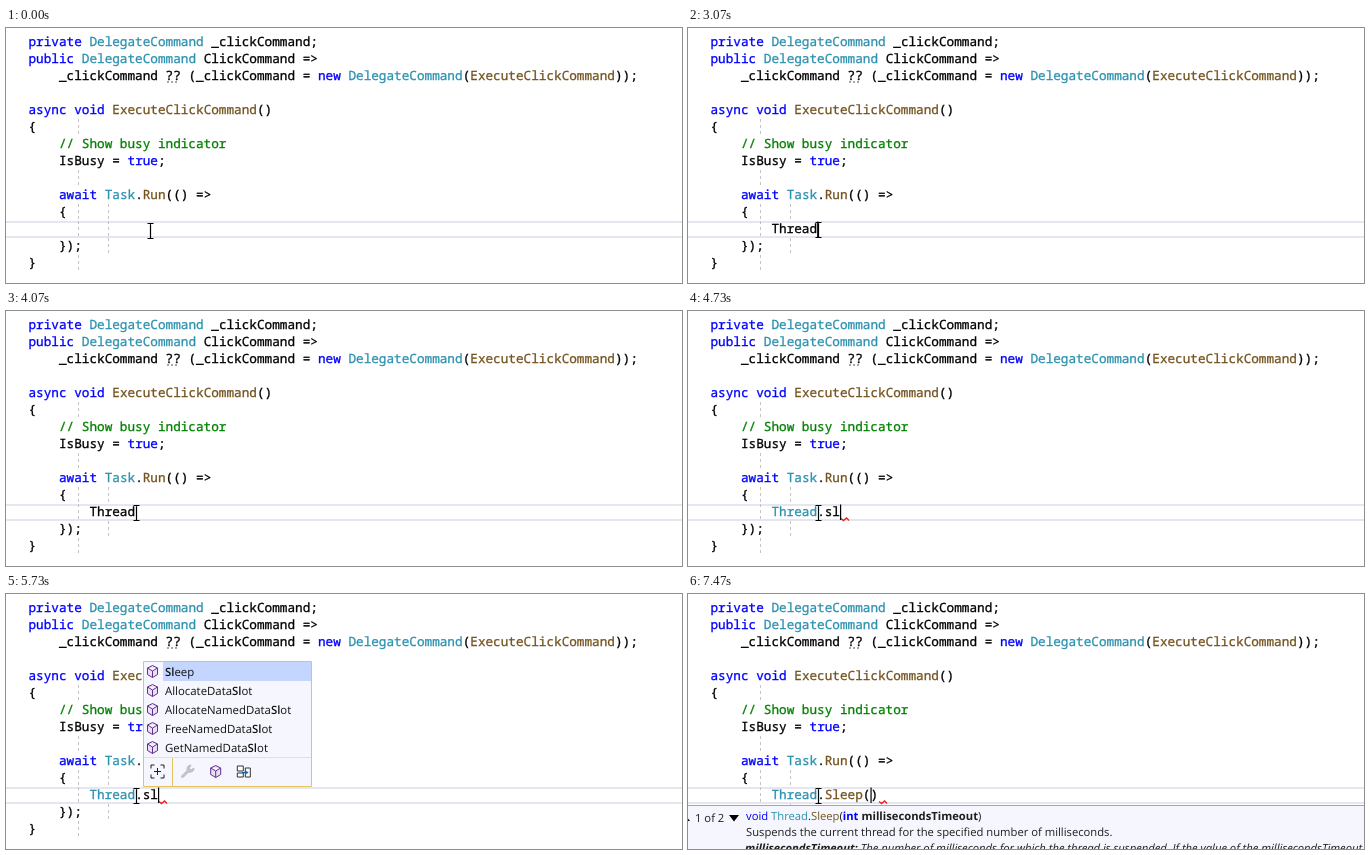
Write an HTML page that moves like this. It is 676 px wide and 255 px high and loops after 8 s.

```html
<!DOCTYPE html>
<html lang="en">
<head>
<meta charset="utf-8">
<title>Code completion</title>
<style>
  html, body { margin: 0; width: 100%; height: 100%; overflow: hidden; background: #fff; }
  svg { display: block; width: 676px; height: 255px; overflow: hidden; }
  text { text-rendering: geometricPrecision; }
  text, tspan { fill: currentColor; }
  .code { font: 12.695px "Noto Sans Mono", "DejaVu Sans Mono", monospace; color: #000; }
  .code tspan { stroke: currentColor; stroke-width: .3; }
  .ui { font: 11.24px "Open Sans", "Noto Sans", sans-serif; color: #1e1e1e; }
  .list { font-size: 11.4px; color: #111; }
  .ns { color: #666; text-anchor: end; }
  .b { font-weight: 700; }
  .list .b { font-weight: 600; }
  .i { font-style: italic; }
  .kw { color: #00f; }
  .type { color: #2b91af; }
  .fn { color: #74531f; }
  .note { color: #008000; }
  .guide { stroke: #c3c3c3; stroke-dasharray: 3 3; }
  .panel { fill: #f6f7fe; stroke: #9ba7c0; }
  .gold { stroke: #e5c365; fill: #f6f7fe; }
  .off { opacity: .3; }
</style>
</head>
<body>
<svg viewBox="0 0 676 255" xmlns="http://www.w3.org/2000/svg">
  <defs>
    <g id="class" fill="#f3e8cb" stroke="#94670f">
      <path d="M-7-2l4-4 4 4-4 4zM2 0l3-3 2.500 2.500-3 3zM1 5l3-3 2.500 2.500-3 3z"/>
      <path d="M0-2h4M-2 1v3h3" fill="none"/>
    </g>
    <g id="delegate" fill="#eadff3" stroke="#652d90">
      <path d="M-6.500-3.500h13v9h-13zM-2.500-3.500v-3h5v3M-3.500-3.500v9M3.500-3.500v9"/>
    </g>
    <g id="enum" fill="#f3e8cb" stroke="#94670f">
      <path d="M-2.500-5.500h9v6h-9zM-6.500-1.500h8v7h-8zM-4.500 1h4M-4.500 3h4M1-3h4"/>
    </g>
    <g id="cube" fill="#eadff3" stroke="#652d90">
      <path d="M0-6l5 2.500v6.500l-5 3-5-3v-6.500zM-5-3.500l5 3 5-3M0-.500v6.500"/>
    </g>
    <g id="expand" fill="none" stroke="#1e1e1e">
      <path d="M-6.500-3v-3.500h3.500M3-6.500h3.500v3.500M6.500 3v3.500h-3.500M-3 6.500h-3.500v-3.500M-3.500 0h7M0-3.500v7"/>
    </g>
    <g id="braces" fill="none" stroke="#333">
      <path d="M-3-5h-1.500v4l-1.500 1 1.500 1v4h1.500M3-5h1.500v4l1.500 1-1.500 1v4h-1.500"/>
    </g>
    <g id="struct" fill="#777" stroke="#444">
      <path d="M-2.500-5.500h9v7h-9zM-6.500-.500h8v6h-8z"/>
    </g>
    <g id="iface" fill="#dcebf8" stroke="#0a5fa8" stroke-width="1.300">
      <circle cx="-4.500" r="2.300"/><circle cx="4.500" r="2.700"/><path d="M-2 0h4"/>
    </g>
    <g id="tag" fill="#ccc" stroke="#333">
      <path d="M-6 1l6-6 6 2v3l-6 5-6-2zM-6 1l6 2 6-5M0 3v2"/>
    </g>
    <g id="bolt" fill="#bbb" stroke="#333"><path d="M0-6.500h4l-3 4.500h3.500l-7.500 8 2-6h-3z"/></g>
    <g id="wrench" fill="#555" stroke="#333">
      <path d="M-6 4.500l5.500-5.500q-1-4 3-5.500l1 .500-2 2.500 2 2 2.500-2 .500 1q-1.500 4-5.500 3l-5.500 5.500q-2 0-1.500-1.500z"/>
    </g>
    <g id="lines" fill="none" stroke="#333" stroke-width="1.500">
      <path d="M-7-5h14M-7-1.500h6M1-1.500h6M-7 2h9M-7 5.500h14"/>
    </g>
    <g id="snippet" fill="none" stroke="#333">
      <path d="M-5.500 5.500v-11h10v11"/><path d="M-5.500 5.500h10" stroke-dasharray="2 1.500"/>
    </g>
    <g id="ext" fill="#fff" stroke="#333">
      <path d="M-6.500-5.500h6v5h-6zM-6.500 1.500h6v4h-6zM1.500-3.500h5v9h-5z"/>
      <path d="M-2 1h6M2-1l2 2-2 2" fill="none" stroke="#0a5fa8"/>
    </g>
  </defs>

  <path d="M0 194h676M0 209h676" stroke="#e6e6f0" stroke-width="2"/>
  <g id="guides" class="guide"></g>
  <path id="midGuide" class="guide" d="M102.500 193v17"/>
  <g id="page" class="code"></g>
  <path d="M161 54h2m2 0h2m2 0h2" stroke="#8a8a8a" stroke-width="1.500"/>
  <g id="typed" class="code"></g>
  <path id="wave" d="M0 207.500l2.500 2 3-2.500 2.500 2.500" fill="none" stroke="#f02020" stroke-width="1.400"/>
  <rect id="caret" y="193.500" width="1.200" height="15.500"/>

  <g id="popups" class="ui"></g>
  <path id="corner" d="M306.500 76v-7.500h8" fill="none" stroke="#9ba7c0"/>
  <g id="sig" class="ui">
    <path class="panel" d="M-2 211.500h680v50H-2z"/>
    <path d="M41 221h10l-5 6.500zM-8 227h10l-5-6.500z"/>
    <text x="7" y="227.500">1 of 2</text>
    <text x="58" y="226"><tspan class="kw">void</tspan> <tspan class="type">Thread</tspan>.<tspan class="fn">Sleep</tspan>(<tspan class="b"><tspan class="kw">int</tspan> millisecondsTimeout</tspan>)</text>
    <text x="58" y="242">Suspends the current thread for the specified number of milliseconds.</text>
    <text x="57" y="258" class="i"><tspan class="b">millisecondsTimeout:</tspan> The number of milliseconds for which the thread is suspended. If the value of the millisecondsTimeout argument is zero</text>
  </g>
  <path id="beam" fill="none" stroke="#000" stroke-width="1.200" d="M-3-7.500h2.500l.500.500.500-.500h2.500M0-7.500v15M-3 7.500h2.500l.500-.500.500.500h2.500"/>
</svg>
<script>
const LOOP = 8000, CH = 7.617, LEFT = 22.5, ROW = 17;
const $ = id => document.getElementById(id);
const colX = col => LEFT + col * CH;

const words = {
  kw: 'private public new async void true await',
  type: 'DelegateCommand Task',
  fn: 'ExecuteClickCommand Run'
};
const styles = {};
for (const k in words) for (const w of words[k].split(' ')) styles[w] = k;

const esc = s => s.replace(/&/g, '&amp;').replace(/</g, '&lt;').replace(/>/g, '&gt;');

// One line of code, every token set on the character grid
function codeLine(row, str, map) {
  let out = '';
  for (const m of str.matchAll(/\/\/.*|\w+|[^\w\s]+/g)) {
    const cls = m[0].startsWith('//') ? 'note' : map[m[0]] || '';
    out += `<tspan x="${colX(m.index)}" class="${cls}">${esc(m[0])}</tspan>`;
  }
  return `<text y="${17.8 + row * ROW}">${out}</text>`;
}

$('page').innerHTML = `private DelegateCommand _clickCommand;
public DelegateCommand ClickCommand =>
    _clickCommand ?? (_clickCommand = new DelegateCommand(ExecuteClickCommand));

async void ExecuteClickCommand()
{
    // Show busy indicator
    IsBusy = true;

    await Task.Run(() =>
    {

    });
}`.split('\n').map((s, i) => codeLine(i, s, styles)).join('');

const guide = (x, row) => `<path d="M${x} ${6 + row * ROW}v${ROW}"/>`;
$('guides').innerHTML = [5, 8, 10, 11, 13].map(r => guide(72.5, r)).join('')
  + guide(102.5, 10) + guide(102.5, 12);

const icon = (id, x, y, cls = '') =>
  `<use href="#${id}" class="${cls}" transform="translate(${x} ${y})"/>`;

// Completion list; rows are [icon, name, namespace], a bar entry with "-" is dimmed
function list({ id, x, w, rows, match, bar, scroll }) {
  const top = -8, end = top + rows.length * 19, right = x + w;
  let out = `<path class="gold" d="M${x + .5} ${top - .5}h${w - 1}V${end + 29.5}h${1 - w}z"/>`
    + `<rect x="${x + 20}" y="${top}" width="${w - (scroll ? 38 : 21)}" height="19" fill="#c4d5ff"/>`;
  rows.forEach(([ic, name, ns = ''], i) => {
    const y = top + 9.5 + i * 19;
    out += icon(ic, x + 9.5, y)
      + `<text class="list" x="${x + 22}" y="${y + 4}">`
      + esc(name).replace(match, m => `<tspan class="b">${m}</tspan>`) + '</text>'
      + `<text class="list ns" x="${right - 21}" y="${y + 4}">${ns}</text>`;
  });
  if (scroll) out += `<path d="M${right - 18} ${top}h17V${end}h-17z" fill="#e8e8ee"/>`
    + `<path d="M${right - 14} 9h9V52h-9z" fill="#c2c3c9"/>`
    + `<path d="M${right - 13.5} ${end - 11}h8l-4 5zM${right - 13.5} 3h8l-4-5z" fill="#868999"/>`
    + `<path d="M${x + 3} ${end + 3}h24v24h-24z" fill="#c4d5ff"/>`;
  out += `<path d="M${x + 1} ${end + .5}h${w - 2}" stroke="#dcdfec"/>`
    + `<path class="gold" d="M${x + (scroll ? 28.5 : 29.5)} ${end + 1}v28"/>`;
  bar.split(' ').forEach((name, i) => {
    const dim = name[0] === '-';
    out += icon(dim ? name.slice(1) : name, x + 14.5 + i * 28.1 + (i ? 2 : 0), end + 14.5, dim ? 'off' : '');
  });
  return `<g id="${id}">${out}</g>`;
}

const tip = (id, x, y, w, ic, head, body) => `<g id="${id}">
  <path class="panel" d="M${x + .5} ${y + .5}h${w}v41h${-w}z"/>${icon(ic, x + 12, y + 12)}
  <text x="${x + 24}" y="${y + 16}">${head}</text><text x="${x + 6}" y="${y + 33}">${body}</text></g>`;

const T = 'System.Threading';
const slots = ['AllocateDataSlot', 'AllocateNamedDataSlot', 'FreeNamedDataSlot', 'GetNamedDataSlot'];
const members = names => names.map(n => ['cube', n]);
const memberBar = 'expand -wrench cube ext';

$('popups').innerHTML =
  list({
    id: 'types', x: 84, w: 368, match: /^Thread/, scroll: true,
    rows: [
      ['class', 'Thread', T], ['class', 'ThreadAbortException', T],
      ['class', 'ThreadExceptionEventArgs', T], ['delegate', 'ThreadExceptionEventHandler', T],
      ['class', 'ThreadingAclExtensions', T], ['class', 'ThreadInterruptedException', T],
      ['class', 'ThreadLocal<>', T], ['delegate', 'ThreadMessageEventHandler', 'System.Windows.Interop'],
      ['enum', 'ThreadOption', 'Prism.Events']
    ],
    bar: 'expand -braces class -struct iface enum delegate -tag -bolt -wrench -cube -lines -snippet'
  })
  + list({
    id: 'wide', x: 137, w: 175, match: /S/, bar: memberBar,
    rows: members(['Sleep', 'SetData', 'SpinWait', ...slots, 'ReferenceEquals', 'ResetAbort'])
  })
  + list({ id: 'short', x: 137, w: 169, match: /Sl/, bar: memberBar, rows: members(['Sleep', ...slots]) })
  + tip('typeTip', 452, -8, 400, 'class',
    `<tspan class="kw">class</tspan> ${T}.<tspan class="type">Thread</tspan>`,
    'Creates and controls a thread, sets its priority, and gets its status.')
  + tip('sleepTip', 306, 68, 385, 'cube',
    '<tspan class="kw">void</tspan> <tspan class="type">Thread</tspan>.<tspan class="fn">Sleep</tspan>(<tspan class="kw">int</tspan> millisecondsTimeout) (+ 1 overload)',
    'Suspends the current thread for the specified number of milliseconds.');

// Value of the last step whose time has come
const at = (t, steps) => steps.filter(s => s[0] <= t).pop()[1];
const show = (id, on) => { $(id).style.display = on ? '' : 'none'; };
const within = (t, a, b) => t >= a && t < b;

const mouse = [[0, [144.5, 203]], [70, [138.5, 203]], [130, [131.5, 202.5]], [270, [130.5, 202]]];
const typing = [[0, ''], [1870, 'T'], [2130, 'Th'], [2330, 'Thr'], [2530, 'Thre'], [2800, 'Threa'],
  [3070, 'Thread'], [4130, 'Thread.'], [4330, 'Thread.s'], [4730, 'Thread.sl'],
  [6070, 'Thread.Sleep'], [7470, 'Thread.Sleep()']];
const blink = [[0, 0], [400, 1], [930, 0], [1470, 1], [3670, 0], [4130, 1], [5200, 0],
  [5730, 1], [6600, 0], [7000, 1]];
const typeFade = [[0, 0], [3930, .5], [4000, 1], [4070, 0]];
const sleepFade = [[0, 0], [5800, .5], [5870, 1], [6070, 0]];

let last = '';
function draw(t) {
  const text = at(t, typing), [mx, my] = at(t, mouse);
  const map = { Thread: t >= 4730 ? 'type' : '', Sleep: t >= 6800 ? 'fn' : '' };
  const key = text + map.Thread + map.Sleep;
  if (key !== last) $('typed').innerHTML = codeLine(11, ' '.repeat(8) + text, map);
  last = key;

  const col = 8 + text.length;
  $('caret').setAttribute('x', colX(t >= 7470 ? col - 1 : col));
  $('wave').setAttribute('transform', `translate(${colX(col) + 1} 0)`);
  $('beam').setAttribute('transform', `translate(${mx} ${my})`);
  $('short').setAttribute('transform', `translate(0 ${t >= 5270 ? 76 : 0})`);
  $('typeTip').style.opacity = at(t, typeFade);
  $('sleepTip').style.opacity = at(t, sleepFade);
  show('caret', at(t, blink));
  show('wave', t >= 4130);
  show('midGuide', t < 2330);
  show('types', within(t, 3670, 4070));
  show('wide', within(t, 5000, 5200));
  show('short', within(t, 5200, 6070));
  show('corner', within(t, 6070, 6130));
  show('sig', t >= 7470);
}

const start = performance.now();
function tick() {
  draw((performance.now() - start) % LOOP);
  requestAnimationFrame(tick);
}
tick();
</script>
</body>
</html>
```
